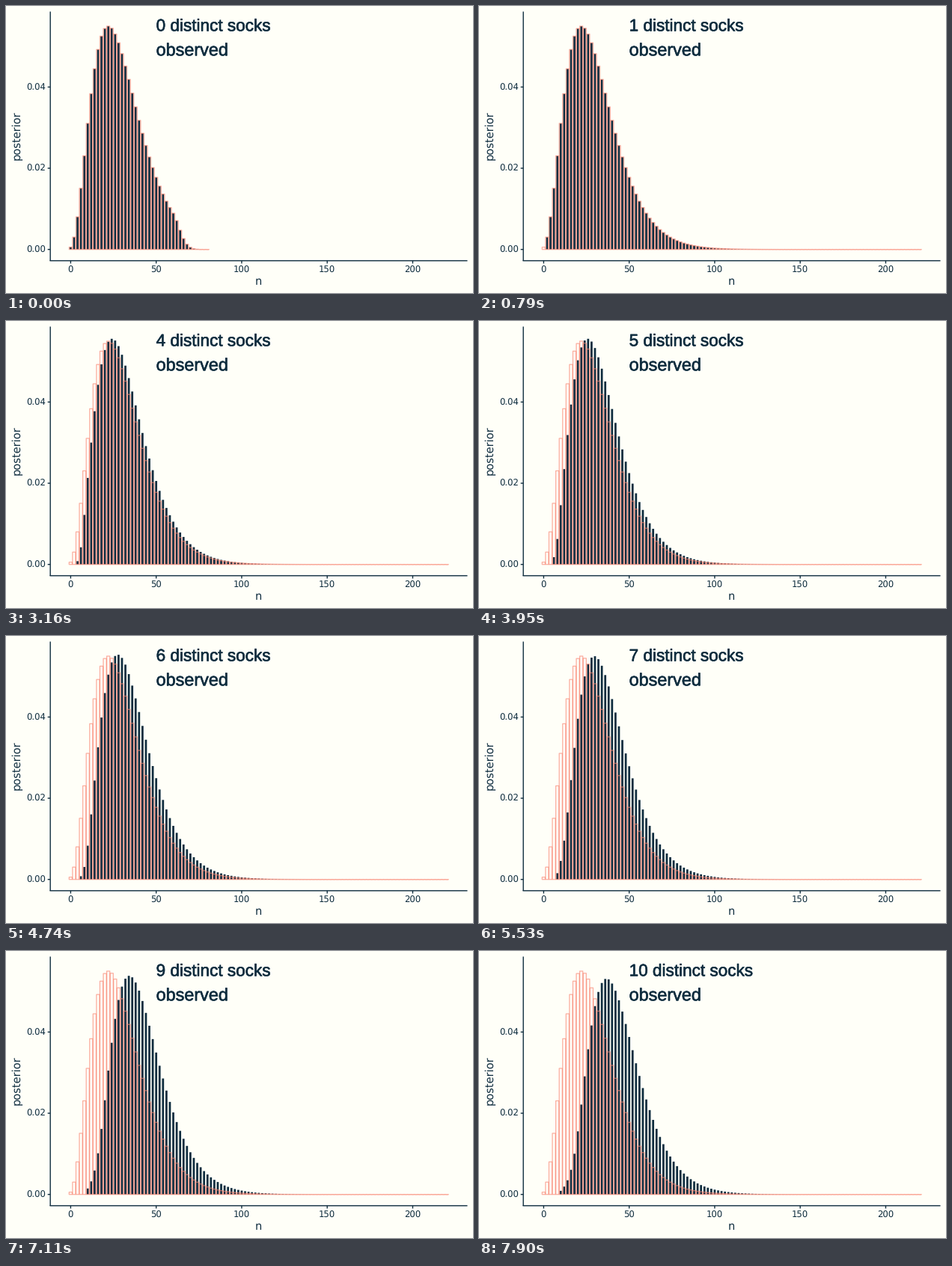
These frames come from a looping animation (624x384 px, 8 s). A matplotlib script:

```python
import math

import matplotlib.pyplot as plt
from matplotlib import patheffects
from matplotlib.animation import FuncAnimation
from matplotlib.collections import LineCollection, PolyCollection

W, H, DPI = 624, 384, 100
LOOP, STEP, HOLD = 8000, 20, 790
PAPER, INK, CORAL = "#fffff8", "#0f2d3f", "#fa8775"
X0, XS = 86.4, 2.2853      # pixel of n = 0, pixels per sock
Y0, YS = 325.7, 5432       # pixel of density 0, pixels per unit
SOCKS = range(0, 221, 2)

plt.rcParams["text.hinting"] = "none"


def px(size):
    return size * 72 / DPI


def neg_binom(n, size=3.75, mu=30):
    if n < 0:
        return 0.0
    logp = (math.lgamma(n + size) - math.lgamma(size) - math.lgamma(n + 1)
            + size * math.log(size / (size + mu))
            + n * math.log(mu / (size + mu)))
    return math.exp(logp) + 0.0003 * math.exp(-n / 2)


def split_moment(n, j, a=3):
    """Mean of s**j, s being the share of socks without a partner."""
    b = max(9, 3.1 + 0.55 * n)
    return math.prod((a + i) / (a + b + i) for i in range(j))


def all_distinct(n, d):
    """Chance that d socks drawn from n are all different."""
    if n < d:
        return 0.0
    k = n // 2
    ways = sum(math.comb(k, j) * math.comb(k - j, d - 2 * j)
               * 2 ** (d - 2 * j) * split_moment(n, j)
               for j in range(min(k, d // 2) + 1))
    return ways / math.comb(n, d)


prior = [neg_binom(n - 1) + neg_binom(n) for n in SOCKS]


def posterior(d):
    raw = [p * all_distinct(n, d) for n, p in zip(SOCKS, prior)]
    total = sum(raw)
    return [v / total for v in raw]


def bars(values, width):
    half = width * XS / 2
    out = []
    for n, v in zip(SOCKS, values):
        x, y = X0 + XS * n, Y0 - YS * v
        out.append([(x - half, Y0), (x - half, y), (x + half, y), (x + half, Y0)])
    return out


# With nothing observed the curve is cut off smoothly and stops at 80.
short = [p * math.exp(-(max(0, n - 60) / 6.9) ** 2)
         for n, p in zip(SOCKS, prior) if n <= 80]
fills = [bars(short, 1.2)] + [bars(posterior(d), 1.2) for d in range(1, 11)]
outlines = [bars(short, 1.8)] + [bars(prior, 1.8)] * 10

fig = plt.figure(figsize=(W / DPI, H / DPI), dpi=DPI, facecolor=PAPER)
ax = fig.add_axes([0, 0, 1, 1])
ax.set(xlim=(0, W), ylim=(H, 0))
ax.axis("off")

dark = PolyCollection([], facecolors=INK, edgecolors="none", zorder=2, snap=False)
frame = PolyCollection([], facecolors="none", edgecolors=CORAL, alpha=0.66,
                       linewidths=px(1.3), zorder=3, snap=False)
ax.add_collection(dark, autolim=False)
ax.add_collection(frame, autolim=False)

lines = [[(59.2, 7.5), (59.2, 341)], [(58.5, 340.8), (616.5, 340.8)]]
label = dict(color=INK, family="DejaVu Sans", fontsize=px(11.6))
for n in range(0, 201, 50):
    x = X0 + XS * n
    lines.append([(x, 341), (x, 344.5)])
    ax.text(x, 357, str(n), ha="center", va="baseline", **label)
for v in (0, 0.02, 0.04):
    y = Y0 - YS * v
    lines.append([(55.7, y), (59, y)])
    ax.text(53.4, y + 4.2, f"{v:.2f}", ha="right", va="baseline", **label)
ax.add_collection(LineCollection(lines, colors=INK, linewidths=px(1.4), zorder=4,
                                 snap=False), autolim=False)

label["fontsize"] = px(14.6)
ax.text(337.7, 373, "n", ha="center", va="baseline", **label)
ax.text(14.6, 173.2, "posterior", rotation=90, ha="center", va="center", **label)

heading = dict(color=INK, family="Liberation Sans", va="baseline",
               path_effects=[patheffects.withStroke(linewidth=px(0.6), foreground=INK)])
count = ax.text(200.6, 33.4, "", fontsize=px(22.55), **heading)
ax.text(200.6, 66.3, "observed", fontsize=px(23.4), **heading)


def update(i):
    d = min(10, (i * STEP + STEP // 2) // HOLD)
    dark.set_verts(fills[d])
    frame.set_verts(outlines[d])
    count.set_text(f"{d} distinct socks")
    return dark, frame, count


anim = FuncAnimation(fig, update, frames=LOOP // STEP, interval=STEP,
                     repeat=True, repeat_delay=0)
plt.show()
```
